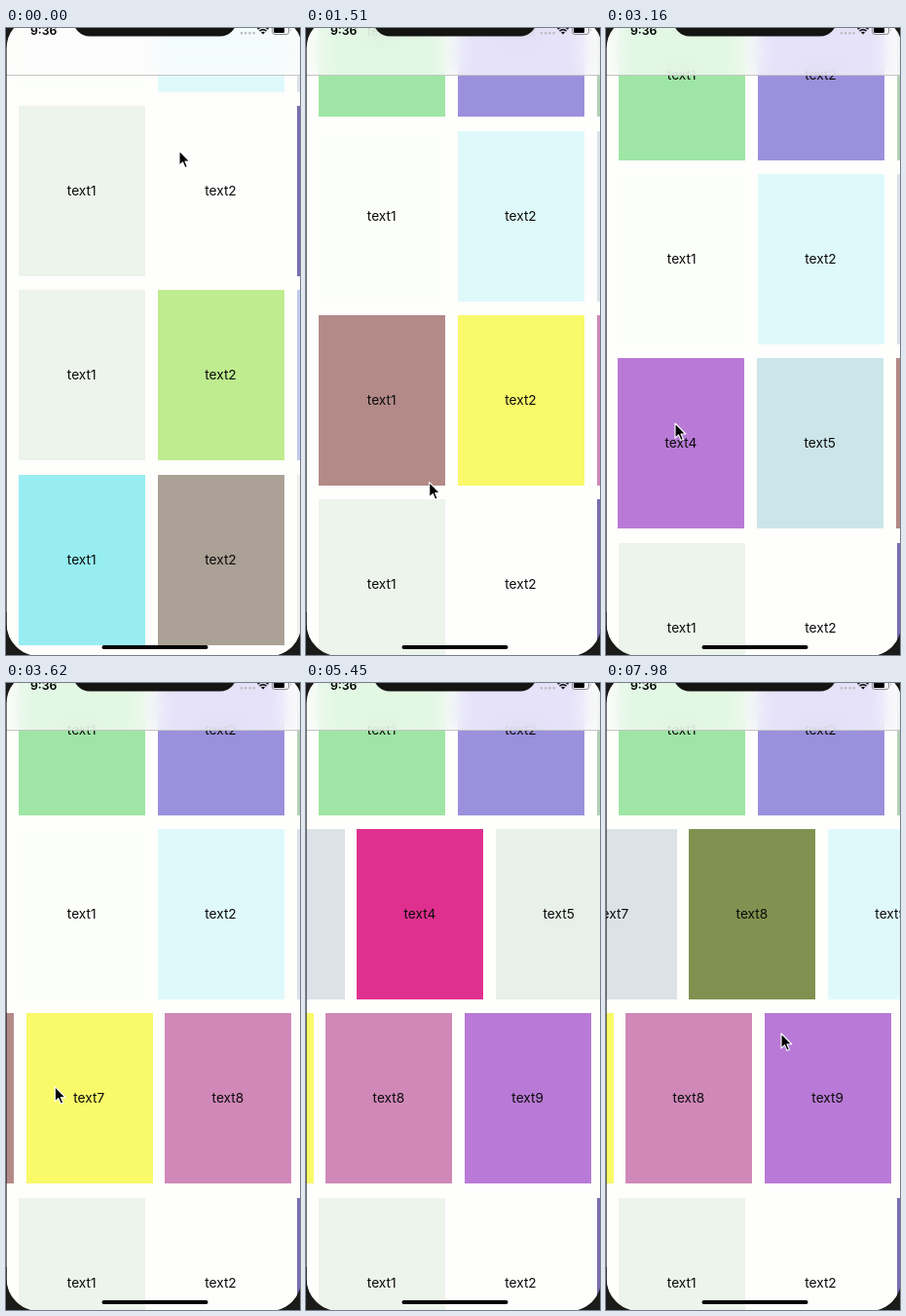
An HTML page that plays this animation: 302x644 px, repeating every 8 s.

```html
<!DOCTYPE html>
<html lang="en">
<head>
<meta charset="utf-8">
<title>Nested scrolling grid</title>
<style>
  html, body { margin: 0; width: 100%; height: 100%; overflow: hidden; }
  #stage { position: relative; width: 302px; height: 644px; overflow: hidden; background: #fefefc; font-family: Inter, Roboto, sans-serif; }
  .row { position: absolute; left: 0; top: 0; }
  .cell { position: absolute; top: 0; width: 130px; height: 175px; line-height: 175px; text-align: center; font-size: 13.7px; color: #0b0b0b; text-indent: -1px; }
  #bar { position: absolute; left: 0; top: 0; width: 302px; height: 48px; border-bottom: 1px solid #c4c6c4; background: rgba(251, 251, 251, .77); backdrop-filter: saturate(1.4) blur(10px); }
  svg { position: absolute; left: 0; top: 0; }
</style>
</head>
<body>
<div id="stage">
  <div id="list"></div>
  <div id="bar"></div>
  <svg width="302" height="644" viewBox="0 0 302 644">
    <text x="25" y="6.5" font-size="12.3" font-weight="600">9:36</text>
    <path d="M242 5.2h14" stroke="#b9bbbb" stroke-width="2.6" stroke-linecap="round" stroke-dasharray="0 4.2"/>
    <path d="M258.5 1.2q5.5-5 11 0M260.5 3.2q3.5-3 7 0" fill="none" stroke="#111" stroke-width="1.6"/>
    <path d="M262 4.6q2-1.6 4 0l-2 2z"/>
    <rect x="273.5" y="-2.5" width="17" height="9" rx="2.5" fill="none" stroke="#8b8d8c"/>
    <rect x="275" y="-1" width="11" height="6" rx="1"/>
    <path d="M292 .5v3q1.5-1.5 0-3" fill="#8b8d8c"/>
    <rect x="69" y="-40" width="168" height="48.5" rx="17" fill="#141412"/>
    <rect x="98.5" y="634" width="109" height="4" rx="2"/>
    <rect x="-9.4" y="-22" width="323.4" height="677" rx="43" fill="none" stroke="#1b1b19" stroke-width="20"/>
    <path d="M-1 600V646H34A33 33 0 0 1 .6 612V600ZM303 600V646H270A33 33 0 0 0 303 612Z" fill="#1b1b19"/>
    <path id="cursor" d="M0 0V15.2L3.5 11.9L6 17.6L8.4 16.5L6 11H10.8Z" stroke="#fff" stroke-width="1.1" stroke-linejoin="round"/>
  </svg>
</div>
<script>
const LOOP = 8000, PITCH_X = 142.75, PITCH_Y = 189.3, LEFT = 13.2, TOP = -39.4;
const TURN = 520; // the list changes direction here

const colours = [
  '9fe5a5 9a90dc b5d0b8',
  'fcfefa dff9fb dbe2e8 e0308f e8f0ea fcfefa dbe2e8 81914f dff9fb',
  'b38a88 f9f96a d088b9 b87ad6 cbe5e9 b38a88 f9f96a d088b9 b87ad6',
  'edf4eb fefefc 7c6db0',
  'edf4eb bfec8f c0cbea',
  '97edf1 aca196 f2eeec',
  'b38a88 f9f96a d088b9'
];

const progress = (t, start, end) => Math.min(1, Math.max(0, (t - start) / (end - start)));
const glide = (t, start, end) => 1 - (1 - progress(t, start, end)) ** 4;
const flick = (t, start, end) => glide(t, start, end) ** 2;
const smooth = (t, start, end) => {
  const u = progress(t, start, end);
  return u * u * (3 - 2 * u);
};

const listScroll = t => 448.6 + 119.2 * glide(t, 60, TURN) - 567.8 * flick(t, TURN, 2310);
const rowScroll = {
  1: t => 388.5 * flick(t, 4480, 5450) + 538.8 * flick(t, 5500, 6300),
  2: t => 439.3 * flick(t, 2560, 3460) + 565.5 * flick(t, 3280, 4180) - 12.5 * smooth(t, 4150, 4500)
};

// Pointer moves: start, end, x, y
const moves = [
  [60, TURN, 205, 316], [TURN, 890, 207, 515], [890, 2280, 16, 400],
  [2460, 2600, 250, 408], [2600, 3160, 71, 406], [3160, 3320, 250, 410], [3320, 3600, 50, 415],
  [3600, 4290, 165, 280], [4480, 4750, -20, 240], [5480, 5580, 260, 240], [5580, 5740, 50, 240],
  [5740, 6100, 130, 418], [6100, 6300, 153, 321], [6600, 6890, 176, 536], [7220, 7330, 180, 377],
  [7970, 7980, 180, 360]
];

function pointer(t) {
  let x = 178, y = 126;
  for (const [start, end, toX, toY] of moves) {
    const u = smooth(t, start, end);
    x += (toX - x) * u;
    y += (toY - y) * u;
  }
  return `translate(${x} ${y})`;
}

const list = document.getElementById('list'), cursor = document.getElementById('cursor');
const rows = colours.map(line => {
  const row = list.appendChild(document.createElement('div'));
  row.className = 'row';
  line.split(' ').forEach((colour, i) => {
    const cell = row.appendChild(document.createElement('div'));
    cell.className = 'cell';
    cell.textContent = 'text' + (i + 1);
    cell.style.left = LEFT + i * PITCH_X + 'px';
    cell.style.background = '#' + colour;
  });
  return row;
});

function draw(t) {
  // Recycled rows 1 and 2 trade places when the list turns
  const order = t < TURN ? [0, 2, 1, 3, 4, 5, 6] : [0, 1, 2, 3, 4, 5, 6];
  rows.forEach((row, i) => {
    const x = Math.round(rowScroll[i]?.(t) ?? 0);
    const y = Math.round(TOP + order[i] * PITCH_Y - listScroll(t));
    row.style.transform = `translate(${-x}px, ${y}px)`;
  });
  cursor.setAttribute('transform', pointer(t));
}

const start = performance.now();
function tick() {
  draw((performance.now() - start) % LOOP);
  requestAnimationFrame(tick);
}
tick();
</script>
</body>
</html>
```
